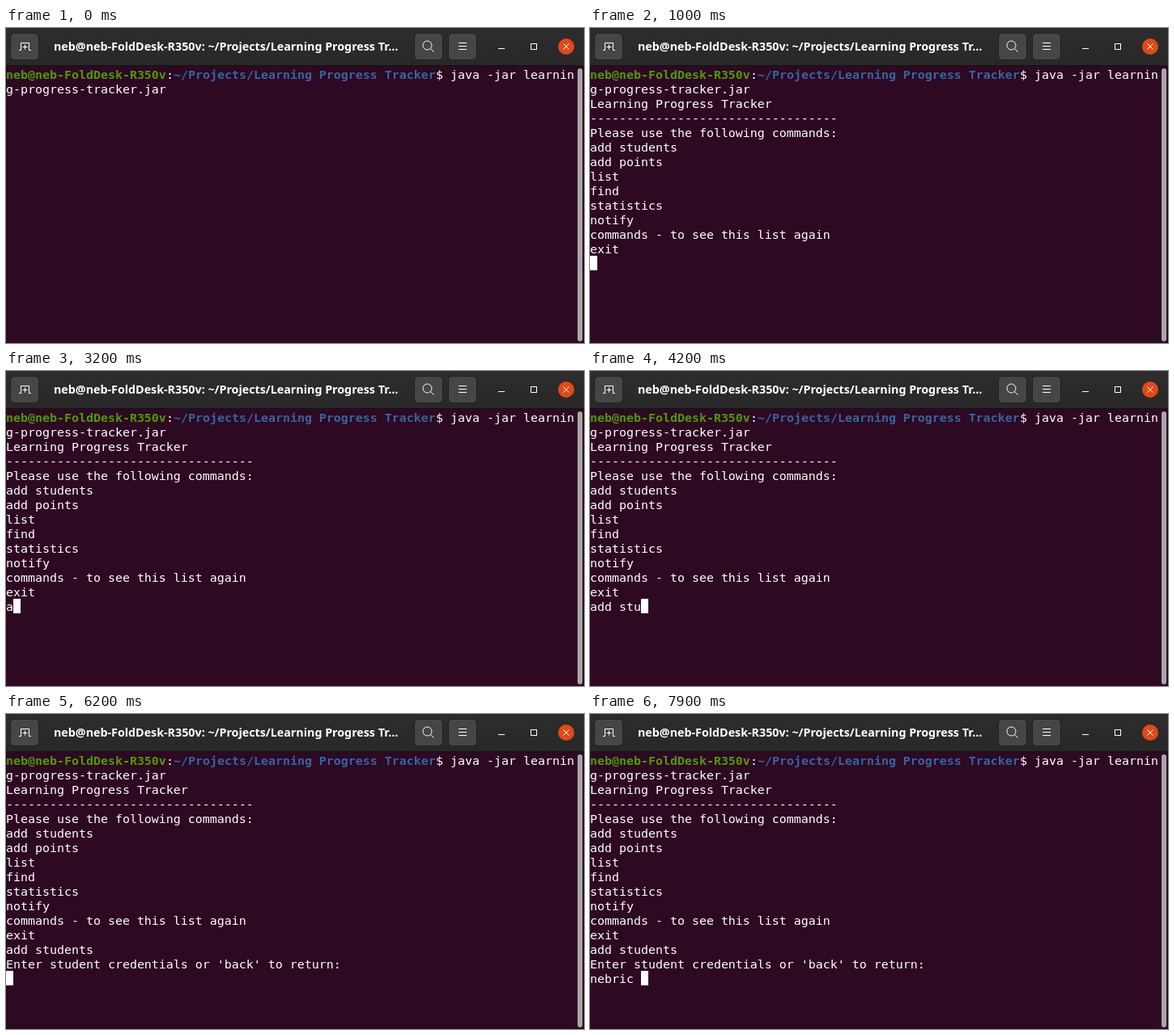
Recreate the animation shown at these times as an HTML page. Size 714x390 px, loop 8 s.

```html
<!DOCTYPE html>
<html lang="en">
<head>
<meta charset="utf-8">
<title>Terminal</title>
<style>
  html, body { margin: 0; width: 100%; height: 100%; overflow: hidden; background: #2d0922; }
  svg { display: block; width: 714px; height: 390px; }
  text { white-space: pre; fill: #fff; }
  .title { font: bold 14.28px "Noto Sans", "Open Sans", sans-serif; }
  .screen text { font: 14.95px "DejaVu Sans Mono", monospace; }
  .screen .user, .screen .path { font-weight: bold; }
  .user { fill: #4e9a06; }
  .path { fill: #3465a4; }
  .button { fill: #464646; stroke: #1f1f1f; }
  .icon { fill: none; stroke: #fff; }
</style>
</head>
<body>
<svg viewBox="0 0 714 390">
  <defs>
    <linearGradient id="bar" x2="0" y2="1">
      <stop stop-color="#2d2d2d"/>
      <stop offset="1" stop-color="#282828"/>
    </linearGradient>
    <rect id="button" class="button" y="6.5" width="35" height="33" rx="5"/>
  </defs>
  <rect width="714" height="390" fill="#2d0922"/>
  <rect width="714" height="46" fill="url(#bar)"/>
  <rect y="46" width="714" height="1" fill="#121212"/>

  <use href="#button" x="5.5"/>
  <use href="#button" x="504.5"/>
  <use href="#button" x="546.5"/>
  <g class="icon">
    <path d="M16 27.5H18.5V18.5H28.5V27.5H31M23.5 20.5V26.5M20.5 23.5H26.5"/>
    <circle cx="520.5" cy="21.5" r="5.5"/>
    <path d="M524.5 25.5L528.5 29.5"/>
    <path d="M559 18.5H569M559 22.5H569M559 26.5H569"/>
    <path d="M608 25.5H616"/>
    <rect x="648.5" y="19.5" width="7" height="7"/>
  </g>
  <circle cx="692" cy="23" r="10" fill="#df4a16"/>
  <path class="icon" d="M688.5 19.5L695.5 26.5M695.5 19.5L688.5 26.5"/>
  <text class="title" x="59" y="28">neb@neb-FoldDesk-R350v: ~/Projects/Learning Progress Tr…</text>

  <g class="screen" id="screen">
    <text y="63" xml:space="preserve"><tspan class="user" x="0">neb@neb-FoldDesk-R350v</tspan><tspan x="198">:</tspan><tspan class="path" x="207">~/Projects/Learning Progress Tracker</tspan><tspan x="531">$ java -jar learnin</tspan></text>
  </g>
  <rect id="cursor" width="9" height="18" fill="#fff"/>
  <rect x="706" y="50" width="6" height="338" rx="3" fill="#aaa5a8"/>
</svg>
<script>
const LOOP = 8000, TICK = 100;
const CELL_W = 9, CELL_H = 18, TOP = 66, BASELINE = 15;
const BLINK = 600, BLINK_PHASES = 3; // the cursor rests hidden after its last phase

const welcome = `Learning Progress Tracker
${'-'.repeat(34)}
Please use the following commands:
add students
add points
list
find
statistics
notify
commands - to see this list again
exit
`;

const events = [];
const print = (at, text) => events.push({ at, text });
const type = (at, text, gap = 0) =>
  [...text].forEach((char, i) => events.push({ at: at + i * gap, text: char, key: true }));

type(-1100, 'g-progress-tracker.jar');
type(600, '\n');
print(1000, welcome);
type(3200, 'ad', 200);
type(3900, 'd stude', 75);
type(4600, 'nt');
type(4800, 's');
type(5000, '\n');
print(5000, "Enter student credentials or 'back' to return:\n");
type(6700, 'n');
type(6900, 'eb');
type(7070, 'ric', 130);
type(7900, ' ');

const screen = document.getElementById('screen');
const cursor = document.getElementById('cursor');
const rowCount = events.map(e => e.text).join('').split('\n').length;

const rows = Array.from({ length: rowCount }, (_, i) => {
  const text = document.createElementNS(screen.namespaceURI, 'text');
  text.setAttribute('y', TOP + i * CELL_H + BASELINE);
  return screen.appendChild(text);
});

function draw(time) {
  const past = events.filter(e => e.at <= time);
  const lines = past.map(e => e.text).join('').split('\n');
  rows.forEach((row, i) => { row.textContent = lines[i] ?? ''; });

  const idle = time - past.findLast(e => e.key).at;
  const phase = Math.min(Math.floor(idle / BLINK), BLINK_PHASES);
  cursor.setAttribute('x', lines.at(-1).length * CELL_W);
  cursor.setAttribute('y', TOP + (lines.length - 1) * CELL_H);
  cursor.setAttribute('visibility', phase % 2 ? 'hidden' : 'visible');
}

const start = performance.now();
let drawn;
function frame() {
  const elapsed = (performance.now() - start) % LOOP;
  const time = Math.floor(elapsed / TICK) * TICK;
  if (time !== drawn) draw(drawn = time);
  requestAnimationFrame(frame);
}
frame();
</script>
</body>
</html>
```
